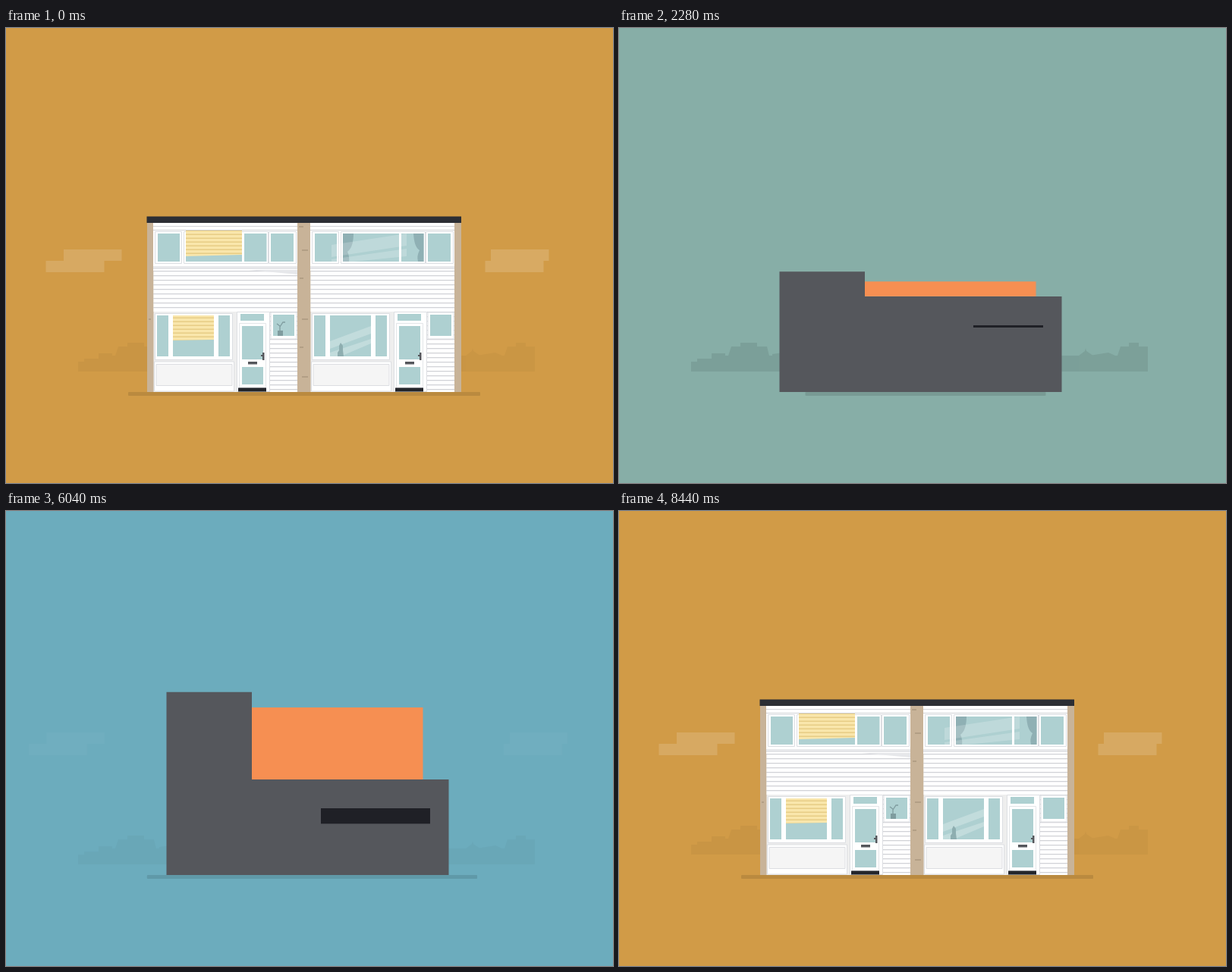
Recreate the animation shown at these times as an HTML page without scripts. Size 800 by 600 pixels, loop 8.48 s.

```html
<!DOCTYPE html>
<html lang="en">
<head>
<meta charset="utf-8">
<title>House rebuild</title>
<style>
html,body{margin:0;width:100%;height:100%;overflow:hidden}
body{background:#d19b47}
svg{display:block;width:100vw;height:100vh}
/* Everything plays for half the loop, then runs backwards. */
body,.move,.out1,.out2,.out3,.out4,.in2,.in3,.in4{animation:4240ms cubic-bezier(.4,0,.3,1) infinite alternate}
body{animation-name:sky;animation-timing-function:linear}
.out1{animation-name:out1}.out2{animation-name:out2}.out3{animation-name:out3}.out4{animation-name:out4}
.in2{animation-name:in2}.in3{animation-name:in3}.in4{animation-name:in4}
.fade{--o:0}
.pop,.up,.down,.left,.right{transform-box:fill-box}
.pop{--z:scale(0);transform-origin:50% 50%}
.up{--z:scaleY(0);transform-origin:50% 100%}
.down{--z:scaleY(0);transform-origin:50% 0}
.left{--z:scaleX(0);transform-origin:0 50%}
.right{--z:scaleX(0);transform-origin:100% 50%}

@keyframes sky{0%,48.6%{background:#d19b47}50.94%{background:#b7a66a}53.77%{background:#87aea7}56.1%,to{background:#6cacbd}}
@keyframes out1{0%,4%{transform:none;opacity:1}18%,to{transform:var(--z,none);opacity:var(--o,1)}}
@keyframes out2{0%,16%{transform:none;opacity:1}30%,to{transform:var(--z,none);opacity:var(--o,1)}}
@keyframes out3{0%,27%{transform:none;opacity:1}36%,to{transform:var(--z,none);opacity:var(--o,1)}}
@keyframes out4{0%,37.5%{transform:none;opacity:1}46%,to{transform:var(--z,none);opacity:var(--o,1)}}
@keyframes in2{0%,59%{transform:var(--z,none);opacity:var(--o,1)}66%,to{transform:none;opacity:1}}
@keyframes in3{0%,63.5%{transform:var(--z,none);opacity:var(--o,1)}71%,to{transform:none;opacity:1}}
@keyframes in4{0%,72.5%{transform:var(--z,none);opacity:var(--o,1)}85%,to{transform:none;opacity:1}}

.cloud{fill:#fff;opacity:.15}
.cl{animation-name:cl}.cr{animation-name:cr}
@keyframes cl{0%{transform:none;opacity:.15;animation-timing-function:ease-in}36.8%{transform:translateX(11px);opacity:.15}45%{transform:translateX(16px);opacity:0}
45.1%,53.5%{transform:translateX(-30px);opacity:0;animation-timing-function:ease-out}71.7%{transform:translateX(-8px);opacity:.1;animation-timing-function:ease-out}85.85%,to{transform:translateX(-2px);opacity:.1}}
@keyframes cr{0%{transform:none;opacity:.15;animation-timing-function:ease-in}36.8%{transform:translateX(-27px);opacity:.15}45%{transform:translateX(-34px);opacity:0}
45.1%,53.5%{transform:translateX(32px);opacity:0;animation-timing-function:ease-out}71.7%{transform:translateX(10px);opacity:.1;animation-timing-function:ease-out}85.85%,to{transform:translateX(4px);opacity:.1}}

.town{animation-name:town}.city{animation-name:city}
@keyframes town{0%,36%{opacity:.035;transform:none}50%,54.5%{opacity:.08;transform:none}61%,to{opacity:0;transform:translateY(20px)}}
@keyframes city{0%,57%{opacity:0;transform:translateY(60px)}68%,to{opacity:.06;transform:none}}
.ground{animation-name:ground;opacity:.11}
@keyframes ground{0%,21%{x:161px;width:464px;animation-timing-function:ease-in}36.8%{x:190px;width:404px;animation-timing-function:linear}
50.94%{x:270px;width:267px;animation-timing-function:linear}53.77%{x:246px;width:316px;animation-timing-function:ease-out}63%,to{x:142px;width:522px}}

.mass{animation-name:mass}
@keyframes mass{
0%,21%{fill:#eee;d:path("M186 480V257H324V257H600V480Z");animation-timing-function:ease-in}
36.8%{fill:#eee;d:path("M220 480V265H324V265H481V480Z");animation-timing-function:linear}
44%{fill:#dcdce0}
50.94%{fill:#71717a;d:path("M264 479V314H400V314H536.5V479Z");animation-timing-function:linear}
53.77%{fill:#55575c;d:path("M211.5 480V322H324V354H583.5V480Z");animation-timing-function:ease-out}
61%,to{fill:#55575c;d:path("M211.5 480V204H324V354H583.5V480Z")}}
.old{animation-name:old}
@keyframes old{0%,21%{transform:none;animation-timing-function:ease-in}36.8%{transform:translate(40.9px,17.8px) scale(.963);animation-timing-function:linear}50.94%,to{transform:translate(126.4px,124.8px) scale(.74)}}
.roof{animation-name:roof}
@keyframes roof{0%,21%{width:414.5px;animation-timing-function:ease-in}36.8%{width:274px}47%,to{width:0}}
.wipe{animation-name:wipe}
@keyframes wipe{0%,27%{d:path("M302 440L302 440L302 440L302 440L302 440L302 440Z")}
36.8%{d:path("M302 373L275 377L250 408L221 431L210 440L302 440Z")}
42%,to{d:path("M302 373L196 373L196 400L196 431L196 440L302 440Z")}}
.slab{animation-name:slab;transform-origin:204px 437px}
@keyframes slab{0%,28%{transform:scaleY(0)}36%,38%{transform:none}43%,to{transform:scaleY(0)}}
.pane{animation-name:pane;transform-box:fill-box;transform-origin:50% 50%}
@keyframes pane{0%,29%{transform:none}36.8%,38%{transform:scale(1.34,1.43)}43%,to{transform:scale(0)}}
.glint{animation-name:glint}
@keyframes glint{0%,27%{transform:none;opacity:.2}36.8%{transform:translate(-3px,-32px) scale(1.02,1);opacity:.22}41%,to{transform:translateY(-44px);opacity:0}}
.brick{animation-name:brick;transform-origin:0 354px}
@keyframes brick{0%,52.8%{transform:scaleY(0)}53.77%{transform:scaleY(.157);animation-timing-function:ease-out}60.5%,to{transform:none}}
.shop{animation-name:shop}
@keyframes shop{0%,52.8%{x:559px;width:0;height:3px}53.77%{x:467px;width:92px;height:3px}56%{x:415px;width:144px;height:3px}62%,to{x:415px;width:144px;height:88px}}
.fill{animation-name:fill;transform-box:fill-box;transform-origin:50% 0}
@keyframes fill{0%,66%{transform:scaleY(0)}71.7%{transform:scaleY(.53)}78%,to{transform:none}}

.g{fill:#aed0d1}.w{fill:#fff}.f{fill:#fff;stroke:#dcdee2}.k{fill:#23252b}.d{fill:#55575c}.p{fill:#c8b398}
</style>
</head>
<body>
<svg viewBox="0 0 800 600" preserveAspectRatio="none">
<defs>
  <pattern id="boards" width="8" height="6" y="320" patternUnits="userSpaceOnUse"><path fill="#fff" d="M0 0h8v6H0z"/><path fill="#d2d3d7" d="M0 0h8v1.3H0z"/></pattern>
  <pattern id="slats" width="8" height="5" y="268" patternUnits="userSpaceOnUse"><path fill="#f9e6ab" d="M0 0h8v5H0z"/><path fill="#e3c77b" d="M0 3.6h8v1.2H0z"/></pattern>
  <pattern id="shutter" width="8" height="4" patternUnits="userSpaceOnUse"><path fill="#4d464d" d="M0 0h8v4H0z"/><path fill="#363238" d="M0 0h8v1.3H0z"/></pattern>
  <pattern id="ribs" width="8" height="8" x="196" patternUnits="userSpaceOnUse"><path fill="#e4e1dd" d="M0 0h8v8H0z"/><path fill="#bdb9b6" d="M3 0h2v8H3z"/></pattern>

  <g id="upper">
    <path fill="#fff" d="M194 257h190v63H194z"/>
    <path stroke="#d2d3d7" stroke-width="1.2" d="M194 261.5h190M194 266.5h190M194 315h190"/>
    <path fill="#e4e5e8" d="M194 316h190v2H194z"/>
    <path class="f" d="M196.500 268.500h35v42h-35zM234.500 268.500h111v42h-111zM346.500 268.500h36v42h-36z"/>
  </g>
  <path id="sides" class="g" d="M200 271h29v37h-29zM314 271h29.500v37H314zM349 271h30v37h-30z"/>
  <g id="shopfront"><path class="f" d="M196.500 376.500h102v61h-102z"/><path class="g" d="M220 379h54v54h-54z"/></g>
  <path id="slits" class="g" d="M199 379h15v54h-15zM280 379h15v54h-15z"/>
  <g id="panel"><path class="f" d="M195.500 440h105v39h-105z"/><path fill="#f5f5f5" stroke="#dcdee2" d="M198 443.500h100v28H198z"/></g>
  <g id="door">
    <path class="f" d="M304.500 374.500h43v105h-43z"/>
    <path class="g" d="M309 377h31v9h-31zM311 393h28v44h-28z"/>
    <path fill="none" stroke="#e3e5e8" d="M307.500 389.500h35v85h-35z"/>
    <path fill="#55575c" d="M319 440h12v3.500h-12zM338 428h2.500v10H338zM336 431h3v2h-3z"/>
    <path class="k" d="M306 474.500h37v5h-37z"/>
  </g>
  <path id="kick" class="g" d="M311 447h28v23h-28z"/>
  <path id="sidewall" fill="url(#boards)" d="M348 374h36v106h-36z"/>
  <g id="porthole"><path class="f" d="M349 375h34v35h-34z"/><path class="g" d="M352 378h28v28h-28z"/></g>

  <g id="block">
    <path class="k" d="M242 228h52v50h-52zM237 278h62v2.500h-62z"/>
    <path fill="#4d4f55" d="M247.500 233h17v40h-17zM270.500 233h19v40h-19z"/>
  </g>
  <path id="lights" class="g" d="M247.500 233h17v40h-17zM270.500 233h19v40h-19z"/>
  <path id="shine" fill="#fff" opacity=".18" d="M247.500 262L264.500 240V273H247.500zM270.500 250L289.500 233V262L270.500 273z"/>
  <path id="roofs" d="M95 453V440h8v-4h19v-7h18v3h4l4-12h12v-5h22v5h13l3 12h4v-2l14-2v4h32l8-6 1-4 1 4 9 6v21z"/>
  <path id="puff" d="M76 292h76.500v15H129.500v15H52.500v-15H76z"/>
</defs>

<g class="move town"><use href="#roofs"/><use href="#roofs" x="358"/><path d="M266 433h192v20H266zM620 432l25-4 9 4h3l4-12h11v-5h13v5h12v33h-77z"/></g>
<path class="move city" d="M98 435V370l3-10 2 40 9 2v28h10v-14h8v-8h6v-8h3v-9h9v9h10v12h6v13h8v-50h8v-7h9v-63h16v125zM636 435V320h11v-10h2l3-7 4-4 5 4 4 7v6h7v-6h17v121z"/>
<use href="#puff" class="cloud move cl"/>
<path class="cloud move cr" d="M639 292h76.500v15H708.500v15H631.500v-15H639z"/>
<rect class="move ground" x="161" y="480" width="464" height="5" rx="1"/>

<g class="move brick"><path fill="#f68f52" d="M324 233h225.500v121H324z"/></g>
<path class="in3 fade" fill="#df8049" d="M324 233h8l46 95v26h-54z"/>
<path class="in3 fade" fill="none" stroke="#e27d47" stroke-width="1.3" d="M378 249h10l2-3h8M426 245h14M441 248h9M481 242h13M495 260h14M524 243h10M536 240h9M330 311h11M385 309h10M398 262h9M460 265h12M335 284h6M520 266h8"/>
<g class="in2 left"><path fill="#504f55" d="M324 224.500h232l-6 9H324z"/><path fill="#3f3e44" d="M324 231h228l-2 2.500H324z"/></g>
<g class="in3 pop"><path fill="#f2f0ee" d="M343 247h37v43h2v4h-41v-4h2z"/></g>
<g class="in3 up"><path fill="#f2f0ee" d="M343 326.500h37V354h-37z"/></g>
<path class="in3 g fade" d="M348 251h8v10.500h-8zM357.500 251h8v10.500h-8zM367 251h8v10.500h-8z"/>
<path class="in4 g down" d="M348 263h8v11h-8zM357.500 263h8v11h-8zM367 263h8v11h-8zM348 276h8v11h-8zM357.500 276h8v11h-8zM367 276h8v11h-8z"/>
<path class="in4 g down" d="M348 331h8v11h-8zM357.500 331h8v11h-8zM367 331h8v11h-8zM348 343.500h8V354h-8zM357.500 343.500h8V354h-8zM367 343.500h8V354h-8z"/>
<path class="in3 up" fill="#e9e9e9" d="M393 294h15v60h-15z"/>

<path class="move mass" fill="#eee" d="M186 480V257H324V257H600V480Z"/>

<g class="move old">
  <g class="out4 up"><path class="p" d="M186 257h8.500v223H186zM384 257h17.500v223H384z"/><path stroke="#9c8a72" d="M386 262h6M390 293h8M387 330h5M390 384h8M387 421h5M390 460h8M188 384h3"/></g>
  <path class="out1 up p" d="M591 257h9v223h-9z"/>
  <g class="out4 left">
    <use href="#upper"/><use href="#sides"/>
    <path class="g" d="M237 271h74v37h-74z"/><path fill="url(#slats)" d="M237 267h74v32l-74 2z"/>
  </g>
  <path class="out4 left" fill="url(#boards)" d="M194.500 320h189.500v54H194.500z"/>
  <path class="out4 fade" fill="#e6e7ea" d="M320 319h64v6z"/>

  <g class="out4 fade">
    <use href="#shopfront"/><path fill="url(#slats)" d="M220 379h54v32l-54 1z"/>
    <use href="#slits" class="out2 down"/>
    <path class="move wipe" fill="#eee" d="M302 440L302 440L302 440L302 440L302 440L302 440Z"/>
  </g>
  <use href="#panel" class="out2 left"/>
  <path class="move slab w" d="M204 360h24l-7 25v52h-17z"/>
  <use href="#sidewall" class="out4 down"/>
  <use href="#door" class="out4 up"/>
  <use href="#kick" class="out2 down"/>
  <use href="#porthole" class="out2 pop"/>
  <g class="out1 up" fill="#7f9c9f"><path d="M358 399h7v7h-7z"/><path fill="none" stroke="#7f9c9f" stroke-width="1.3" d="M361 399v-6l-4-3M361 394l4-6h3"/></g>

  <path class="out2 right" fill="url(#boards)" d="M401.500 320H591v54H401.500z"/>
  <use href="#sidewall" x="207" class="out1 right"/>
  <use href="#porthole" x="207" class="out1 pop"/>
  <use href="#door" x="207" class="out2 up"/>
  <use href="#kick" x="207" class="out1 down"/>
  <use href="#panel" x="207" class="out2 left"/>
  <use href="#shopfront" x="207" class="out2 pop"/>
  <use href="#slits" x="207" class="out1 down"/>
  <g class="out1 fade"><path fill="#fff" opacity=".25" d="M427 413l54-20v10l-54 20zM427 428l54-18v6l-40 17h-14z"/><path fill="#8eaeb0" d="M437 433v-5l2-3v-6l2-4 3 4v6l1 8z"/></g>
  <g class="out4 left"><use href="#upper" x="207"/></g>
  <use href="#sides" x="207" class="out3 pop"/>
  <path class="move pane g" d="M444 271h74v37h-74z"/>
  <path class="out1 fade" fill="#8fb0b4" d="M444 271h14q0 18-8 24 3 6 2 13h-8zM550.500 271H537q1 18 8 22-4 8-2 15h7.500z"/>
  <path class="move glint" fill="#fff" opacity=".2" d="M429 286l99-15v16l-99 15zM429 305l99-14v10l-70 7h-29z"/>
  <rect class="move roof" x="185.500" y="248.500" width="414.500" height="8.500" fill="#2c2e34"/>
</g>

<g class="in2 up">
  <path fill="#abcfd0" d="M583 275h38v205h-38z"/>
  <path fill="#bdd7d7" d="M583 358h15l22 62v6h-37z"/>
  <path fill="none" stroke="#1e2025" stroke-width="3.500" d="M583 357h38M583 423h38"/>
</g>
<g class="in2 up">
  <path fill="#abcfd0" d="M408 275h213v80H408z"/>
  <path fill="none" stroke="#1b1d22" stroke-width="4" d="M409.500 355V274.500H621M449 274v81M492 274v81M536 274v81M581 274v81M408 355h175"/>
</g>
<path class="in3 fade" fill="#fff" opacity=".12" d="M451 337l39-11v8l-39 12zM494 325l40-11v8l-40 12zM538 313l41-11v14l-41 11zM411 348l36-10v9l-22 6h-14z"/>
<g class="in3 down"><path stroke="#86a7aa" d="M600.500 276v46"/><path fill="#86a7aa" d="M597 321h7l3 6h-14z"/></g>
<g class="in2 up"><path class="d" d="M621 271h14.500v209H621z"/><path fill="#46474d" d="M620 271h4v209h-4zM618 265h20.500v6H618z"/></g>
<g class="in2 pop"><path fill="#504d54" d="M206 193.500h124l-5 11H211z"/><path fill="#414047" d="M209 202h118l-2 3H211z"/></g>

<rect class="move shop" x="559" y="392" width="0" height="3" fill="#1f2026"/>
<path class="in2 g up" d="M419 423h136.500v51H419z"/>
<path class="in2 down" fill="url(#shutter)" d="M418 395h138.500v28H418z"/>
<g class="in4 fade"><path fill="#fff" opacity=".14" d="M419 458l136-58v24l-136 48z"/></g>
<path class="in3 down" fill="none" stroke="#7c9093" stroke-width="1.200" d="M422.500 423v37q2 4 3.500 0V423"/>
<path class="in3 pop" fill="none" stroke="#7f9497" stroke-width="1.500" d="M550 447l-2 13h-14q2 3 12 3l3-3M538 463l-4 10M546 463l5 10M537 470l12-5"/>
<path class="in3 fade" fill="#4a4b50" d="M559 397l16 54v29h-16zM388 397l11 49h-11z"/>

<g class="in2 pop"><use href="#block"/></g>
<g class="in2 pop"><use href="#block" y="81"/></g>
<g class="in2 pop"><use href="#block" y="166"/></g>
<g class="in2 pop"><use href="#block" x="89" y="166"/></g>
<g class="in3 down"><use href="#lights"/></g>
<path class="in3 down" fill="url(#shutter)" d="M246 232h19v30h-19zM270 232h21v30h-21z"/>
<g class="in3 down"><use href="#lights" y="81"/></g>
<g class="move fill"><use href="#lights" y="166"/></g>
<g class="move fill"><use href="#lights" x="89" y="166"/></g>
<g class="in4 fade"><use href="#shine" y="81"/><use href="#shine" y="166"/><use href="#shine" x="89" y="166"/></g>
<g class="in4 up"><path fill="#7f9497" d="M340 434h7v8h-7z"/><path fill="none" stroke="#7f9497" d="M343 434v-9l-4-3M343 429l4-7"/></g>
<g class="in3 pop"><path class="w" d="M223 374q6.500-2 13 0v5l-4 3-2.500 2-2.500-2-4-3z"/><path class="k" d="M226 376h7v2.500h-7z"/></g>

<path class="in2 up" fill="url(#ribs)" d="M196 452h32.500v28H196z"/>
<g class="in3 up"><rect x="199" y="400" width="26.500" height="50" rx="8" fill="#a5a54c"/><path fill="#8e9140" d="M212 400h-5q-8 0-8 8v34q0 8 8 8h5zM211 449h2.500v4H211z"/></g>
<g class="in4 pop"><path stroke="#8e9140" stroke-width="1.500" d="M225 420l5-2"/><circle cx="231" cy="418" r="4.200" fill="#8e9140"/></g>
<path class="in3 up" fill="#8e9140" d="M575 459q1-5 5-4 3-5 7-2 4-1 6 2 4 0 4 4z"/>
<path class="in2 up" fill="url(#ribs)" d="M574 458h23v22h-23z"/>
</svg>
</body>
</html>
```
